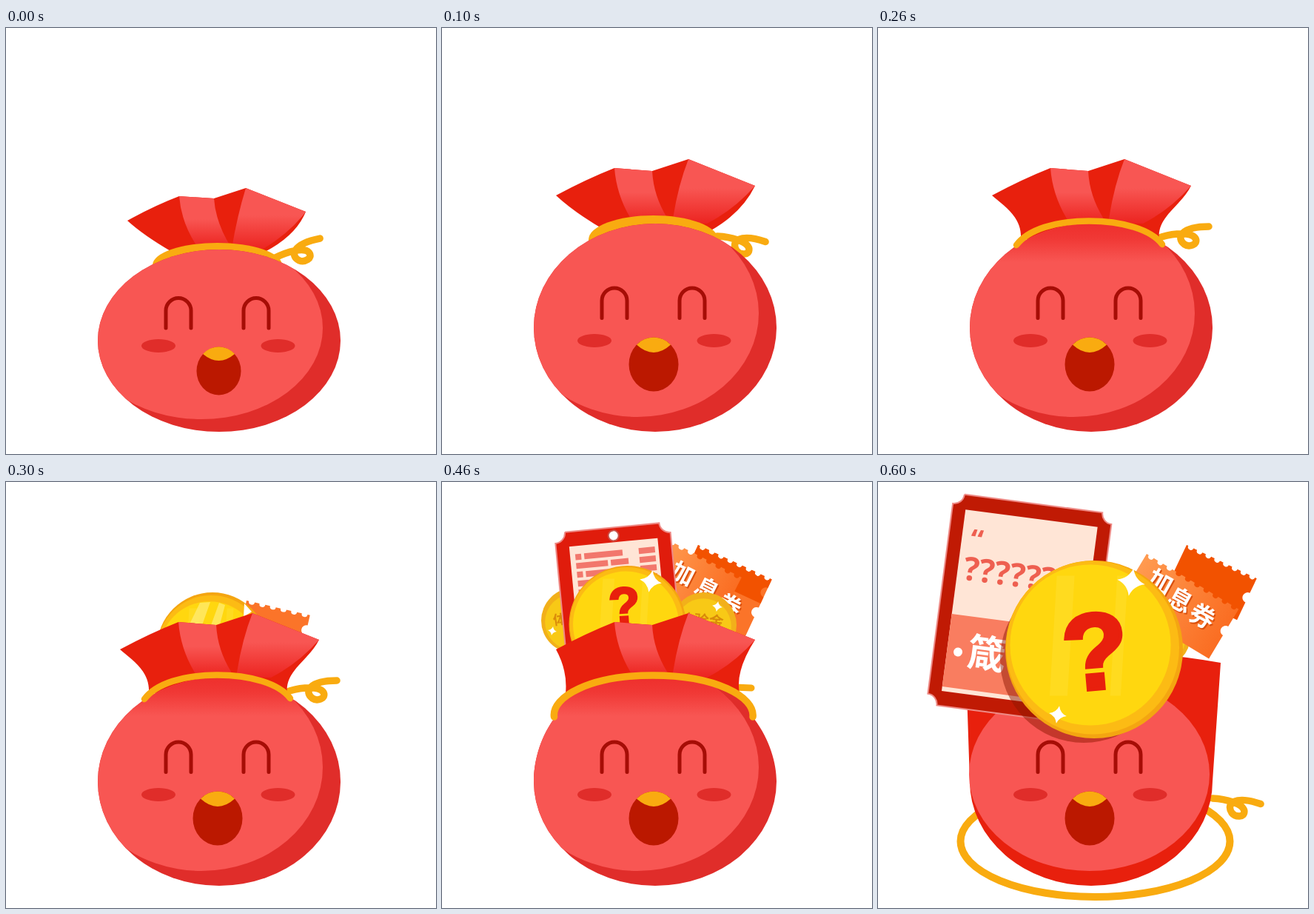
An HTML page for the animation above (0.7 s loop, 581 px wide and 575 px high).

```html
<!DOCTYPE html>
<html lang="zh">
<head>
<meta charset="utf-8">
<title>Lucky bag</title>
<style>
html, body { margin: 0; width: 100%; height: 100%; overflow: hidden; background: #fff; }
svg { display: block; width: 581px; height: 575px; }
</style>
</head>
<body>
<svg viewBox="0 0 581 575">
  <defs>
    <linearGradient id="cloth" x1="0" y1="0" x2="0" y2="1">
      <stop offset=".45" stop-color="#f85653"/><stop offset="1" stop-color="#ec2420"/>
    </linearGradient>
    <linearGradient id="glow" gradientUnits="userSpaceOnUse" x1="0" y1="264" x2="0" y2="316">
      <stop offset="0" stop-color="#ee2f2c"/><stop offset=".4" stop-color="#ee2f2c" stop-opacity=".75"/>
      <stop offset="1" stop-color="#ee2f2c" stop-opacity="0"/>
    </linearGradient>
    <linearGradient id="paper" x1="0" y1="0" x2="1" y2="0">
      <stop offset="0" stop-color="#ff9a50"/><stop offset="1" stop-color="#fa6d22"/>
    </linearGradient>
  </defs>
  <g id="scene"></g>
</svg>
<script>
const RED = '#e8200d', LIGHT = '#f85653', DARK = '#e02d2a', GOLD = '#f9ab10';
const STEP = 100;
const CJK = "'Noto Sans CJK SC','Noto Sans CJK',sans-serif";
const scene = document.getElementById('scene');

const path = (d, fill, extra = '') => `<path d="${d}" fill="${fill}" ${extra}/>`;
const line = (d, color, width) =>
  path(d, 'none', `stroke="${color}" stroke-width="${width}" stroke-linecap="round" stroke-linejoin="round"`);
const oval = (x, y, rx, ry, fill, extra = '') =>
  `<ellipse cx="${x}" cy="${y}" rx="${rx}" ry="${ry}" fill="${fill}" ${extra}/>`;
const box = (x, y, w, h, fill) => `<rect x="${x}" y="${y}" width="${w}" height="${h}" fill="${fill}"/>`;
const group = (x, y, turn, body) => `<g transform="translate(${x} ${y}) rotate(${turn})">${body}</g>`;
const label = (x, y, size, text, fill, { turn = 0, family = CJK, extra = 'text-anchor="middle"' } = {}) =>
  group(x, y, turn, `<text font-family="${family}" font-size="${size}" font-weight="900" fill="${fill}" ${extra}>${text}</text>`);

function star(x, y, s, turn = 10) {
  const k = s * .22;
  return group(x, y, turn,
    path(`M0 ${-s}Q${k} ${-k} ${s} 0Q${k} ${k} 0 ${s}Q${-k} ${k} ${-s} 0Q${-k} ${-k} 0 ${-s}`, '#fff'));
}

function face(squashed) {
  const eyeY = squashed ? 405 : 391.5, cheekY = squashed ? 429 : 422;
  const eye = x => line(`M${x} ${eyeY}v-23.5a17 17 0 0 1 34 0v23.5`, '#a60d06', 5);
  const mouth = squashed
    ? oval(287.5, 463, 30, 32.5, '#bb1800') + path('M266 440A30 32.5 0 0 1 309 440Q287.5 458 266 440', GOLD)
    : oval(286, 454, 33.5, 36.5, '#bb1800') + path('M263 427.5A33.5 36.5 0 0 1 309 427.5Q286 448.5 263 427.5', GOLD);
  return eye(216) + eye(321) + oval(206, cheekY, 23, 9, DARK) + oval(367.5, cheekY, 23, 9, DARK) + mouth;
}

// Dark outline shape with a shifted light ellipse clipped inside it.
function body(d, lightY, ry, glowing) {
  const light = fill => oval(264, lightY, 164, ry, fill, 'clip-path="url(#inside)"');
  return `<clipPath id="inside"><path d="${d}"/></clipPath>` + path(d, DARK) + light(LIGHT) +
    (glowing ? light('url(#glow)') : '');
}
const egg = (cy, ry) => `M124 ${cy}a164 ${ry} 0 0 1 328 0a164 ${ry} 0 0 1 -328 0`;

const curl = (x, y, turn) => group(x, y, turn,
  line('M0 0C17-5 41-7 46 2C50 11 37 14 31 10C19 1 27-14 64-14', GOLD, 9.5));

function crown(right, left) {
  return path(`M154 226Q195 204 233 189L284 193L333 177L423 213${right}L${left}154 226`, RED) +
    path('M233 189L284 193Q286 230 308 262L258 262Q236 228 233 189', 'url(#cloth)') +
    path('M333 177L423 213Q395 245 358 264L311 264Q318 215 333 177', 'url(#cloth)');
}
const lowCrown =
  path('M164 260Q200 240 234 227L281 230L324 216L405 248Q392 280 350 302L224 302Q186 280 164 260', RED) +
  path('M234 227L281 230Q283 262 304 296L259 296Q237 264 234 227', 'url(#cloth)') +
  path('M324 216L405 248Q385 275 348 298L305 298Q312 255 324 216', 'url(#cloth)');
const neckCrown = crown('C410 240 376 255 380 285', '193 285C195 255 170 240 ');
const wideCrown = crown('Q396 255 402 285', '167 285Q170 255 ');

const neckBody = body(egg(404.5, 140.5), 385, 140, true) +
  line('M187 293C203 272 240 260.5 285 260.5S369 272 384 292', GOLD, 8.5);
const wideBody = body('M151 320C131 348 124 380 124 404A164 141 0 0 0 452 404C452 380 443 348 422 320' +
  'C424 290 370 262 285 262S149 290 151 320', 385, 140, true) +
  line('M151.5 317C148 290 200 261 285 261S423 290 420 317', GOLD, 9.5);

const pocket =
  path('M119 252Q200 229 290 229T463 244L452 404A164 141 0 0 1 124 404Z', RED) +
  oval(285.5, 394.5, 162.5, 130.5, LIGHT);
const rope = oval(293.5, 485, 182, 75, 'none', `stroke="${GOLD}" stroke-width="10"`) + curl(452, 427, 19);

// Coin with its face shifted by dx, dy to show the thickness of the rim.
function coin(x, y, r, dx = 0, dy = 0) {
  const f = r * .905, bar = (from, w) =>
    path(`M${x + from * r} ${y + dy - .78 * r}h${w * r}l${-.08 * r} ${1.35 * r}h${-w * r}z`, '#ffe445', 'opacity=".3"');
  return oval(x, y, r, r, '#f4a511') +
    oval(x + dx * .4, y + dy * .4, r * .975, r * .975, '#fcbb14') +
    oval(x + dx, y + dy, f, f, '#ffd70f') + bar(-.42, .2) + bar(.26, .12);
}
const ask = (x, y, size, turn) => label(x, y, size, '?', RED, {
  turn, family: "'Liberation Sans',Arial,sans-serif",
  extra: `text-anchor="middle" stroke="${RED}" stroke-width="${size / 28}"`
});
const smallCoin = (x, y, r) => oval(x, y, r, r, '#f2b01a') + oval(x - 1, y + 2, r * .86, r * .86, '#f8c916');

function card(x, y, turn, w, h, margin, fill, content) {
  const n = 14;
  const d = `M${n} 0H${w - n}A${n} ${n} 0 0 0 ${w} ${n}V${h - n}A${n} ${n} 0 0 0 ${w - n} ${h}` +
    `H${n}A${n} ${n} 0 0 0 0 ${h - n}V${n}A${n} ${n} 0 0 0 ${n} 0`;
  return group(x, y, turn, path(d, fill, 'stroke="#ee8a86" stroke-width="2"') +
    box(margin, margin + 2, w - 2 * margin, h - 2 * margin - 4, '#ffe5d6') + content);
}
const hole = x => oval(x, 11, 7, 7, '#fff', 'stroke="#c9524a" stroke-width="2"');
const words = (x, y, size, text) => label(x, y, size, text, '#ee5f50', { family: "'Noto Sans',sans-serif", extra: '' });

function bars() {
  const rows = [[25, 8, 37, 52, 111, 22], [25, 43, 72, 24, 111, 22]];
  let out = '';
  for (let i = 0; i < 6; i++) {
    const row = rows[i % 2];
    for (let j = 0; j < row.length; j += 2) out += box(row[j], 31 + 12 * i, row[j + 1], 8, '#f2776c');
  }
  return out;
}

// Voucher with a perforated upper edge.
function ticket(x, y, turn, w, h, fill) {
  const teeth = Math.round(w / 14), pitch = w / teeth, gap = (pitch - 8) / 2;
  const edge = `h${gap}a4 4 0 0 0 8 0h${gap}`.repeat(teeth);
  return group(x, y, turn, path(`M0 0${edge}V${h * .35}a7 7 0 0 0 0 14V${h}H0Z`, fill));
}
function voucher(points, turn, size) {
  return [...'加息券'].map((c, i) => {
    const [x, y] = points[i];
    return label(x + 1.5, y + 2, size, c, '#d94f0c', { turn }) + label(x, y, size, c, '#fff', { turn });
  }).join('');
}
const backTicket = ticket(417, 85, 25.5, 105, 62, '#f25200');
const frontTicket = ticket(363, 97, 31, 145, 78, 'url(#paper)');

const frames = [
  () => curl(364, 310, -11) + lowCrown + oval(285.5, 320, 87.5, 30, GOLD) +
    body(egg(422, 123), 405, 123, false) + face(true),

  () => curl(372, 281, 19) + crown('Q405 250 362 274', '222 274Q180 250 ') +
    oval(285.5, 285.5, 87.5, 32.5, GOLD) + body(egg(404.5, 140.5), 385, 140, false) + face(false),

  () => curl(383, 282, 0) + neckCrown + neckBody + face(false),

  () => ticket(325, 160, 13, 88, 40, '#fb7429') + coin(279, 224, 75, -4, 5) +
    path('M262 163L276 162L264 196L246 196ZM288 163L296 166L288 196L276 196Z', '#ffee80', 'opacity=".65"') +
    path('M322 164L332 175L321 182Z', '#fff') +
    curl(383, 282, 0) + neckCrown + neckBody + face(false),

  () => ticket(346, 85, 25, 110, 120, '#fb7429') + ticket(346, 85, 25, 110, 36, '#f25200') +
    ticket(305, 78, 27, 112, 130, 'url(#paper)') +
    voucher([[320, 134], [353, 155], [383, 177]], 27, 32) +
    smallCoin(178, 187, 44) + label(160, 192, 18, '体', '#d98a0a', { turn: -8 }) + star(149, 201, 6) +
    smallCoin(354, 193, 44) + label(350, 194, 20, '体验金', '#d98a0a', { turn: 5 }) + star(372, 168, 7) +
    card(152, 69, -5.5, 156, 190, 18, '#e01c0c', bars() + hole(79)) +
    coin(250.5, 192, 79, -2, 0) + ask(248, 191, 70, -4) + star(282, 134, 15) +
    line('M395 277L418 278', GOLD, 9) + wideCrown + wideBody + face(false),

  () => backTicket + frontTicket + voucher([[374, 154], [402, 174], [433, 195]], 24, 34) +
    smallCoin(155, 218, 40) + star(127, 230, 6) +
    smallCoin(384, 214, 40) + label(378, 222, 23, '验金', '#d98a0a', { turn: 8 }) + star(404, 196, 8) +
    card(133, 29, .5, 222, 290, 20, '#dc1b08',
      words(25, 66, 36, '“') + words(29, 91, 46, '???????') + hole(111)) +
    oval(246, 210, 106, 106, '#a01c12', 'opacity=".9"') +
    coin(267.5, 168, 104.5, -2.5, 2) + ask(267, 206, 119, -2) + star(313, 92, 17) +
    rope + pocket + face(false),

  () => rope + backTicket + smallCoin(382, 209, 40) + frontTicket +
    voucher([[375, 146], [402, 170], [432, 192]], 29, 34) + pocket + face(false) +
    card(103, 15, 7.5, 216, 287, 18, '#c01a04',
      box(18, 162, 180, 99, '#f97d60') + words(30, 72, 38, '“') + words(26, 114, 44, '???????') +
      oval(33, 212, 6, 6, '#fff') + label(72, 228, 52, '箴', '#fff') + label(126, 228, 52, '言', '#fff')) +
    oval(278, 239, 113, 113, '#8a1500', 'opacity=".48"') +
    coin(292, 226, 120, -5, -6) + ask(298, 279, 146, -5) + star(342, 135, 19) + star(243, 314, 12)
];

let shown = -1;
const start = performance.now();
function update() {
  const index = Math.floor((performance.now() - start) / STEP) % frames.length;
  if (index !== shown) scene.innerHTML = frames[shown = index]();
  requestAnimationFrame(update);
}
update();
</script>
</body>
</html>
```
